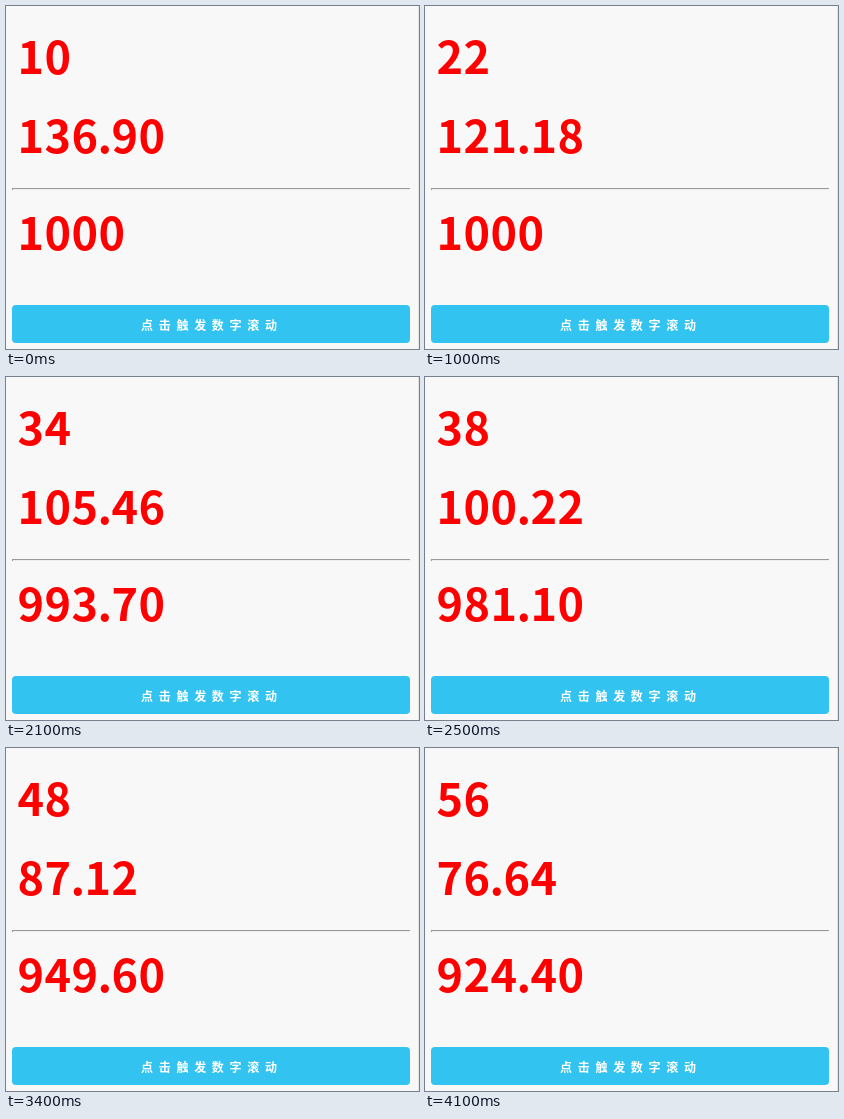
These frames come from a looping animation (413 px wide and 343 px high, 4200 ms). An HTML page:

```html
<!DOCTYPE html>
<html lang="zh">
<head>
<meta charset="utf-8">
<title>数字滚动</title>
<style>
  html, body { margin: 0; width: 100%; height: 100%; overflow: hidden; background: #f8f8f8; }
  svg { display: block; width: 413px; height: 343px; }
  text { font-family: "Noto Sans CJK SC", "Noto Sans CJK", "Open Sans", sans-serif; font-weight: 700; text-anchor: middle; }
  .num { font-size: 45px; fill: #f00; }
  .label { font-size: 12px; fill: #fff; }
</style>
</head>
<body>
<svg viewBox="0 0 413 343">
  <rect width="413" height="343" fill="#f8f8f8"/>
  <rect x="412" width="1" height="343" fill="#e4e4e4"/>
  <text class="num" id="up" y="68"></text>
  <text class="num" id="down" y="147"></text>
  <rect x="6" y="182" width="398" height="1" fill="#9a9a9a"/>
  <rect x="6" y="183" width="398" height="1" fill="#eee"/>
  <rect x="6" y="183" width="1" height="1" fill="#9a9a9a"/>
  <text class="num" id="clicked" y="244"></text>
  <rect x="6" y="299" width="398" height="38" rx="4" fill="#33c3f0"/>
  <text class="label" id="label" y="324"></text>
</svg>
<script>
  const LOOP = 4200;
  const TICKS = [0, 100, 300, 500, 600, 800, 1000, 1200, 1400, 1600, 1700, 1900,
    2100, 2300, 2500, 2600, 2800, 3000, 3200, 3400, 3600, 3700, 3900, 4100];
  const CLICK = 11;
  const DIGIT = 27, DOT = 13;
  const $ = id => document.getElementById(id);

  // Place each character at the centre of its own cell
  function setText(el, str, left, cell) {
    let x = left;
    const xs = [...str].map(ch => {
      const w = cell(ch), mid = x + w / 2;
      x += w;
      return mid;
    });
    el.setAttribute("x", xs.join(" "));
    el.textContent = str;
  }

  const setNumber = (id, str) => setText($(id), str, 11.3, ch => ch === "." ? DOT : DIGIT);

  let shown = -1;
  function draw(now) {
    const t = now % LOOP;
    const step = TICKS.filter(at => at <= t).length - 1;
    if (step === shown) return;
    shown = step;
    const rolled = Math.max(0, step - CLICK);
    setNumber("up", String(10 + 2 * step));
    setNumber("down", (136.9 - 2.62 * step).toFixed(2));
    setNumber("clicked", rolled ? (1000 - 6.3 * rolled).toFixed(2) : "1000");
  }

  setText($("label"), "点击触发数字滚动", 132.2, () => 17.7);

  const start = performance.now();
  function frame() {
    draw(performance.now() - start);
    requestAnimationFrame(frame);
  }
  frame();
</script>
</body>
</html>
```
